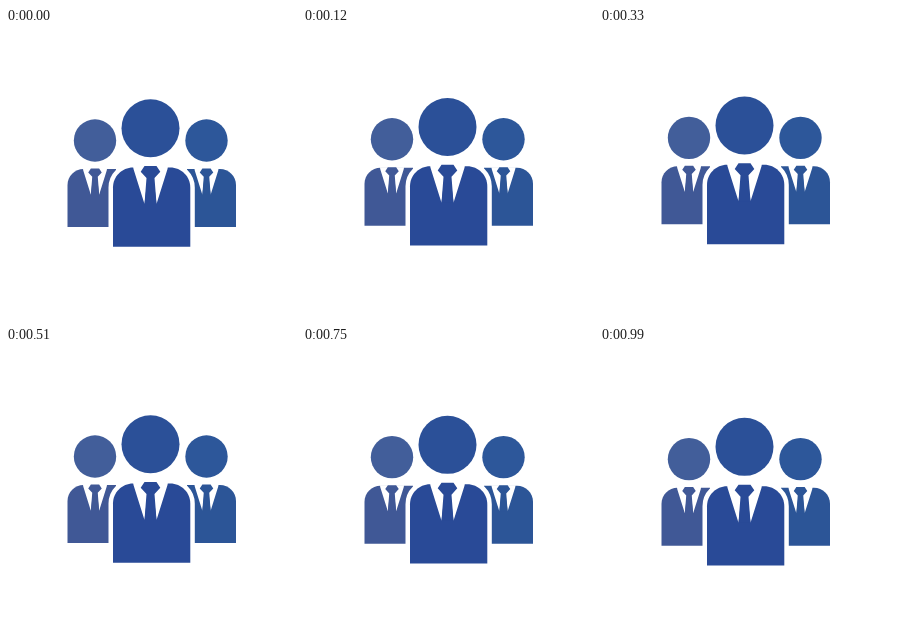
Animation of 291x291 px, one loop 1020 ms. Source, as an HTML page with a canvas:

```html
<!DOCTYPE html>
<html lang="en">
<head>
<meta charset="utf-8">
<title>Team</title>
<style>
  html, body { margin: 0; width: 100%; height: 100%; overflow: hidden; background: #fff; }
  canvas { display: block; width: 291px; height: 291px; }
</style>
</head>
<body>
<canvas id="stage"></canvas>
<script>
const SIZE = 291, LOOP = 1020, STEP = 30, LIFT = 3;
const canvas = document.getElementById('stage');
const ctx = canvas.getContext('2d');
const dpr = window.devicePixelRatio || 1;
canvas.width = canvas.height = SIZE * dpr;

function disc(x, y, r, color) {
  ctx.fillStyle = color;
  ctx.beginPath();
  ctx.arc(x, y, r, 0, Math.PI * 2);
  ctx.fill();
}

function poly(points, color) {
  ctx.fillStyle = color;
  ctx.beginPath();
  points.forEach(([x, y]) => ctx.lineTo(x, y));
  ctx.closePath();
  ctx.fill();
}

// Torso with separately rounded shoulders
function torso(l, r, top, bottom, rl, rr) {
  const k = 0.45;
  ctx.beginPath();
  ctx.moveTo(l, bottom);
  ctx.lineTo(l, top + rl);
  ctx.bezierCurveTo(l, top + rl * k, l + rl * k, top, l + rl, top);
  ctx.lineTo(r - rr, top);
  ctx.bezierCurveTo(r - rr * k, top, r, top + rr * k, r, top + rr);
  ctx.lineTo(r, bottom);
  ctx.closePath();
}

// White shirt with a tie; s scales the whole collar
function collar(x, y, s, color) {
  const at = pts => pts.map(([a, b]) => [x + a * s, y + b * s]);
  for (const m of [-1, 1]) {
    poly(at([[0, -1.5], [m * 17.5, -1.5], [m * 17, 1.5], [m * 6, 36.5], [m * 3, 11], [0, 11]]), '#fff');
  }
  poly(at([[-6, -1.5], [6, -1.5], [9.8, 4.2], [4, 10.5], [6, 36.5], [-6, 36.5], [-4, 10.5], [-9.8, 4.2]]), color);
}

function side(x, l, r, rl, rr, head, body) {
  disc(x, 112.5, 21.2, head);
  torso(l, r, 141, 199, rl, rr);
  ctx.fillStyle = body;
  ctx.fill();
  collar(x, 141.5, 0.69, body);
}

function draw(t) {
  const u = Math.floor(t / STEP) * STEP / (LOOP / 2) - 1;
  const y = -LIFT * (1 - u * u);
  ctx.setTransform(dpr, 0, 0, dpr, 0, 0);
  ctx.fillStyle = '#fff';
  ctx.fillRect(0, 0, SIZE, SIZE);
  ctx.translate(0, y);

  side(89, 61.5, 110, 16, 0, '#425e9a', '#405896');
  side(200.5, 181, 230, 0, 16, '#2d579a', '#2c5597');

  torso(107, 184.3, 139.5, 218.8, 20, 20);
  ctx.strokeStyle = '#fff';
  ctx.lineWidth = 9;
  ctx.stroke();
  ctx.fillStyle = '#294a97';
  ctx.fill();
  collar(144.5, 139.5, 1, '#294a97');
  disc(144.5, 100.2, 29, '#2b5098');
}

function tick() {
  draw(performance.now() % LOOP);
  requestAnimationFrame(tick);
}
tick();
</script>
</body>
</html>
```
